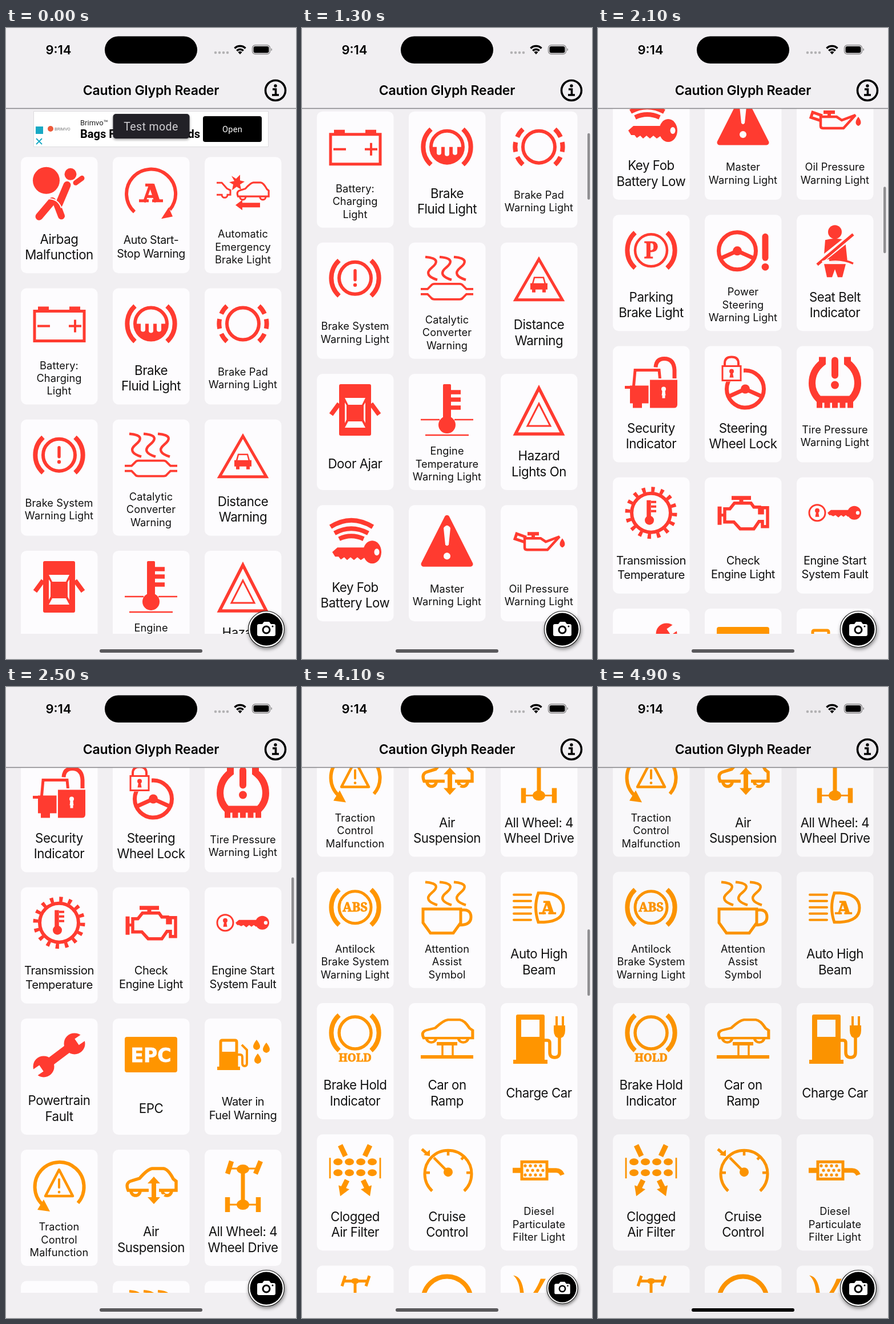
An HTML page that plays this animation: 508 px wide and 1102 px high, repeating every 5000 ms.

```html
<!DOCTYPE html>
<html lang="en">
<head>
<meta charset="utf-8">
<title>Dashboard lights</title>
<style>
html, body { margin: 0; width: 100%; height: 100%; overflow: hidden; background: #f1eff2 }
svg { display: block; width: 508px; height: 1102px; font-family: Inter, "Noto Sans", sans-serif }
.ad { font-family: Roboto, sans-serif }
.mid { text-anchor: middle }
#fab { filter: drop-shadow(1px 3px 3px #0007) }
#menu { filter: drop-shadow(1px 2px 2px #0007) }
</style>
</head>
<body>
<svg viewBox="0 0 508 1102">
  <clipPath id="view"><path d="M0 141H508V1058H0z"/></clipPath>
  <g id="app">
    <path d="M-80 -80H588V1182H-80z" fill="#f1eff2"/>
    <g clip-path="url(#view)">
      <g id="list">
        <g class="ad">
          <path d="M48.5 145.5h411v62h-411z" fill="#fff" stroke="#dcdbde"/>
          <path d="M52 172h13v13h-13z" fill="#18a9c4"/>
          <path d="M53 193l10 10m0-10l-10 10" stroke="#18a9c4" stroke-width="1.8"/>
          <circle cx="78" cy="176" r="5" fill="#ee5a3a"/>
          <text x="85" y="179" font-size="7.5" fill="#777">BRIMVO</text>
          <text x="130" y="170" font-size="13" fill="#222">Brimvo™</text>
          <g font-size="20" font-weight="700">
            <text x="130" y="192">Bags For</text>
            <text x="340" y="192" text-anchor="end">Weekends</text>
          </g>
          <rect x="345" y="154" width="103" height="45" rx="4"/>
          <text class="mid" x="396.5" y="182" font-size="14.5" fill="#fff" letter-spacing=".3">Open</text>
          <rect x="187.5" y="150" width="134" height="43" rx="5" fill="#222127" style="filter:drop-shadow(0 2px 2px #0006)"/>
          <text class="mid" x="254" y="179" font-size="19.5" fill="#cfced2" letter-spacing=".4">Test mode</text>
        </g>
      </g>
      <rect id="bar" x="500" width="4.5" height="116" rx="2.2" fill="#908f92"/>
    </g>
    <path d="M0 140.5H508" stroke="#858487" stroke-width="1.5"/>
    <text class="mid" x="254" y="117" font-size="23" font-weight="600" letter-spacing="-.2">Caution Glyph Reader</text>
    <g fill="none" stroke="#000" stroke-width="3.6">
      <circle cx="472" cy="109" r="17.5"/>
      <path d="M467 107h5.5v9.5M466 117h12"/>
    </g>
    <circle cx="472" cy="101" r="2.7"/>
  </g>
  <path id="shade" d="M0 0H508V1102H0z"/>

  <text class="mid" x="92" y="46" font-size="22" font-weight="600">9:14</text>
  <rect x="173" y="14.5" width="162" height="47.5" rx="23.7"/>
  <path id="dots" d="M367 43h0m7 0h0m7 0h0m7 0h0" stroke="#807f82" stroke-opacity=".55" stroke-width="4.6" stroke-linecap="round"/>
  <path d="M400.5 35.5a13.5 13.5 0 0 1 19 0M404.3 39.7a8 8 0 0 1 11.4 0" fill="none" stroke="#000" stroke-width="3.5"/>
  <path d="M410 46l-3.5-3.8a5 5 0 0 1 7 0z"/>
  <rect x="431.5" y="30" width="31" height="15.5" rx="5" fill="none" stroke="#000" stroke-opacity=".45" stroke-width="1.3"/>
  <rect x="433.5" y="32" width="27" height="11.5" rx="3"/>
  <path d="M464.5 35q3 2.5 0 5.5z" fill-opacity=".5"/>

  <g id="menu">
    <rect x="337" y="851" width="74" height="33" rx="4" fill="#fff"/>
    <rect x="351" y="922" width="60" height="33" rx="4" fill="#fff"/>
    <g class="mid" font-size="16.5" font-weight="500">
      <text x="374" y="874">Camera</text>
      <text x="381" y="945">Photo</text>
    </g>
    <g fill="none" stroke="#fff" stroke-width="3.5">
      <path d="M451 857h6l3-4.5h12l3 4.5h6q3 0 3 3v20q0 3-3 3h-30q-3 0-3-3v-20q0-3 3-3z"/>
      <ellipse cx="466" cy="869" rx="7" ry="8"/>
    </g>
    <circle cx="479" cy="861.5" r="1.8" fill="#fff"/>
    <rect x="447" y="922" width="38" height="33" rx="4" fill="#fff"/>
    <path d="M450 948l9-9 6 5 9-9 9 11v5h-33z" fill="#4d4b4d"/>
    <circle cx="459" cy="932" r="4" fill="#4d4b4d"/>
  </g>

  <g id="fab">
    <circle r="31.5" fill="#fff" stroke="#222" stroke-width="1.2"/>
    <circle r="28.5"/>
    <path d="M-13 -9h6l3-4h9l3 4h5q3 0 3 3v15q0 3-3 3h-26q-3 0-3-3v-15q0-3 3-3z" fill="#fff"/>
    <circle cx="0" cy="1" r="6" fill="none" stroke="#000" stroke-width="3"/>
    <circle cx="11" cy="-5" r="1.5"/>
  </g>
  <rect id="home" x="164" y="1085" width="180" height="6" rx="3"/>
</svg>
<script>
const $ = id => document.getElementById(id);
const RED = '#ff3b30', ORANGE = '#ff9500', WHITE = '#fdfcfe', INK = 'currentColor';
const L = 27.4, M = 24.6, S = 22.4;   // label line heights

// Drawing helpers; every icon is centred on 0,0 in a 92 px box
const fill = (d, c = INK) => `<path d="${d}" fill="${c}"/>`;
const line = (d, w = 4, c = INK, more = '') =>
  `<path d="${d}" fill="none" stroke="${c}" stroke-width="${w}" ${more}/>`;
const round = (d, w, c) => line(d, w, c, 'stroke-linecap="round" stroke-linejoin="round"');
const dot = (x, y, r, c = INK, ry = r) => `<ellipse cx="${x}" cy="${y}" rx="${r}" ry="${ry}" fill="${c}"/>`;
const ring = (x, y, r, w, dash = '') =>
  `<circle cx="${x}" cy="${y}" r="${r}" fill="none" stroke="${INK}" stroke-width="${w}" stroke-dasharray="${dash}"/>`;
const word = (s, y, size, c = INK, font = '"Noto Serif", serif') =>
  `<text class="mid" y="${y}" font-size="${size}" font-weight="900" fill="${c}" stroke="${c}" stroke-width=".8" style='font-family:${font}'>${s}</text>`;
const move = (t, s) => `<g transform="${t}">${s}</g>`;
const mirror = s => s + move('scale(-1 1)', s);

// Shared parts
const brackets = dash => line('M-28 -31A42 42 0 0 0 -28 31M28 -31A42 42 0 0 1 28 31', 8, INK, `stroke-dasharray="${dash || ''}"`);
const brake = (s, w = 6, dash) => move('translate(0 -3)', brackets(dash) + ring(0, 0, 28, w) + s);
const heat = y => [-38, -13, 12].map(x => line(`M${x} ${y}c24 2 22 10 11 19s-6 16 10 21`, 4.4)).join('');
const bang = (y, h, w, gap, x = 0) => round(`M${x} ${y}v${h}`, w) + dot(x, y + h + gap, w * .58);
const drop = (x, y) => fill(`M${x} ${y}q12 15 0 18q-12-3 0-18z`);
const car = w => line('M-40 6q-6-14 7-17l13-4q14-16 22-17h20q8 1 17 18l5 4v16z', w)
  + line('M-35 7a8 8 0 0 0 16 0M20 7a8 8 0 0 0 16 0', w);
const wheel = (x, y) => ring(x, y, 32.5, 7) + line(`M${x - 29} ${y + 13}L${x} ${y}L${x + 29} ${y + 13}`, 7) + dot(x, y, 8);
const keyhole = (x, y, c) => dot(x, y, 4, c) + fill(`M${x - 1.5} ${y}h3l2 11h-7z`, c);
const gauge = line('M-29 31A43 43 0 1 1 33 27', 6);
const slabA = line('M-2 -14L-12 14M-9 4h17M-21 11.5h17M2 11.5h19M-10 -16h14', 5) + line('M1 -17L11 13', 10);

const cards = [
  ['Airbag|Malfunction', L, dot(-22.5, -24, 23.5) + dot(20, -35, 10.5) + round('M14 -16L0 17', 13)
    + round('M29 -20L40 -28', 9) + round('M-12 12L-35 39', 13) + round('M-4 17L4 38', 12) + line('M-18 8Q-2 8 4 24', 2, WHITE)],
  ['Auto Start-|Stop Warning', 24, gauge + fill('M18 43L38 39L31 23z') + slabA],
  ['Automatic|Emergency|Brake Light', S, move('translate(17 0) scale(.64)', car(5)) + line('M-46 -20h9l9 10 6 3v8h-5a5 5 0 0 1-10 0h-9', 3)
    + fill('M-20 -32l8 5 7-7v10l8 2-8 5 2 9-8-5-8 6 2-10-7-4 9-2z') + fill('M-13 19l12-9v5h31v8h-31v5z')],

  ['Battery:|Charging|Light', S, line('M-43 -25h87v52h-87z', 5) + fill('M-37 -33h19v8h-19zM18 -33h19v8h-19z')
    + line('M-38 1h22M17 1h22M28 -10v22', 4)],
  ['Brake|Fluid Light', L, brake(fill('M-28 0h56a28 28 0 0 1-56 0z') + round('M-14 0v10M0 0v12M14 0v10', 8, WHITE))],
  ['Brake Pad|Warning Light', S, brake('', 6, '17 9.5')],

  ['Brake System|Warning Light', S, brake(bang(-13, 16, 5.5, 9))],
  ['Catalytic|Converter|Warning', S, heat(-40)
    + line('M-46 16h12l6-6q2-3 6-3h44q4 0 6 3l6 6h12M-46 25h12l6 6q2 3 6 3h44q4 0 6-3l6-6h12', 3.8)],
  ['Distance|Warning', L, line('M0 -36L41 35H-41z', 5) + line('M-11 7l3-11h16l3 11', 2.5)
    + fill('M-15 6h30v11h-30zM-12 17h6v5h-6zM6 17h6v5h-6z')],

  ['Door Ajar', L, fill('M-25 -47h50q3 0 3 3v84q0 3-3 3h-50q-3 0-3-3v-84q0-3 3-3z')
    + fill('M-18 -23h36l-6 12h-24zM-18 29h36l-6-11h-24zM-18 -15l3 5v25l-3 6zM18 -15l-3 5v25l3 6z', WHITE) + mirror(line('M-28 -13L-42 6', 8))],
  ['Engine|Temperature|Warning Light', S, fill('M-7 -45q0-2 2-2h10q2 0 2 2v62h-14z') + dot(0, 24, 15)
    + line('M6 -33h18M6 -20h18M6 -6h18', 7.5) + line('M-46 15h33M13 15h33M-38 42h76', 2.5)],
  ['Hazard|Lights On', L, line('M0 -40L41 40H-41z', 5.5) + line('M0 -13L20 26H-20z', 3)],

  ['Key Fob|Battery Low', L, line('M-43 -27q36-23 74 0M-36 -16q29-16 59 0M-28 -6q21-10 43 0', 8)
    + dot(30, 17, 16, INK, 20) + dot(38, 17, 4.5, WHITE, 6) + fill('M-40 17l9-8h50v16l-9 6-6-5-6 5-6-5-6 5-5-5-6 4-4-5h-6z')],
  ['Master|Warning Light', S, fill('M0 -43L41 38H-41z') + round('M0 -43L41 38H-41z', 9)
    + fill('M-6 -25q6-9 12 0l-3 29q-3 4-6 0z', WHITE) + dot(0, 24, 6, WHITE)],
  ['Oil Pressure|Warning Light', S, line('M-25 -7h28l9 6 24-9-21 23h-36q-4 0-4-4z', 4.5) + line('M-24 0l-18-6 3-9 17 6', 5)
    + line('M-20 -15h20M-10 -15v9', 6) + fill('M41 -7q9 12 0 16q-9-4 0-16z')],

  ['Parking|Brake Light', L, brake(word('P', 14, 39), 4.5)],
  ['Power|Steering|Warning Light', S, wheel(-10, -2) + bang(-27, 37, 11, 16, 39)],
  ['Seat Belt|Indicator', L, dot(0, -35, 12) + fill('M-17 -21q17-5 35 0l4 38h-42zM-19 21h38l-6 23h-8l-5-14-5 14h-9z')
    + line('M-34 22L35 -33', 11, WHITE) + line('M-31 22L32 -31', 5) + line('M-22 18q24-9 52 3', 5, WHITE) + line('M-10 14q22-3 42 6', 3.5)],

  ['Security|Indicator', L, line('M-31 10l3-33h42l3 30', 5) + fill('M-37 4h38v31h-17v8h-16v-8h-5z') + line('M-46 7h13', 5)
    + line('M8 -28q1-15 15-15q17 0 18 20v18', 7) + line('M-3 43v-50h49', 3, WHITE)
    + fill('M-2 -6h48v43q0 6-6 6h-42z') + keyhole(22, 10, WHITE) + line('M22 12v14', 5, WHITE)],
  ['Steering|Wheel Lock', L, wheel(4, 10) + fill('M-40 -35h41v32h-41z', WHITE) + line('M-36 -30h32v25h-32z', 3)
    + line('M-32 -31v-4q0-11 12-11t12 11v4', 4) + keyhole(-20, -21)],
  ['Tire Pressure|Warning Light', S, line('M-22 -46v10q-18 14-18 36q0 16 12 28h56q12-12 12-28q0-22-18-36v-10', 12)
    + line('M-32 37h64', 12, INK, 'stroke-dasharray="10 3.5"') + bang(-40, 26, 12, 17)],

  ['Transmission|Temperature', 25, ring(0, -3, 34, 6) + ring(0, -3, 41, 9, '6 10.1') + line('M-4 -25v30', 7.5) + dot(-3, 10, 8)
    + line('M0 -22h9M0 -14h9M0 -6h9', 4)],
  ['Check|Engine Light', M, line('M-32 -10h9l8-10h29l5 7h10v10h5v-9h9v33h-9v-9h-6l-9 13h-24l-11-12h-16z', 5.5)
    + line('M-20 -29h34M-3 -29v9', 7) + line('M-41 -14v32', 7) + line('M-41 1h9', 5)],
  ['Engine Start|System Fault', M, ring(-31, -3, 14, 3) + keyhole(-31, -7) + fill('M-13 -3l6-5h34v9l-4 3-4-3-4 3-4-3-5 4-5-4-4 2-4-2h-3z')
    + dot(34, -3, 12) + dot(40, -3, 3.2, WHITE)],

  ['Powertrain|Fault', L, line('M-24 17L24 -19', 15) + dot(-27, 19, 18.5) + dot(27, -21, 18.5)
    + line('M-31 22L-50 35M31 -24L50 -37', 13, WHITE)],
  ['EPC', L, fill('M-42 -33h84q4 0 4 4v54q0 4-4 4h-84q-4 0-4-4v-54q0-4 4-4z') + word('EPC', 11, 33, WHITE, '"DejaVu Sans", sans-serif'), ORANGE],
  ['Water in|Fuel Warning', M, line('M-39 22v-46q0-3 3-3h22q3 0 3 3v46', 5) + fill('M-40 -7h30v28h-30zM-45 19h40v6h-40z')
    + line('M-10 -2h5q4 0 4 5v10q0 5 4 5t4-5v-23l-9-9', 4) + drop(24, -28) + drop(41, -23) + drop(26, -4), ORANGE],

  ['Traction|Control|Malfunction', S, move('scale(-1 1)', line('M-33 28A43 43 0 1 1 29 31', 6)) + fill('M-38 40L-16 43L-27 22z')
    + round('M0 -30L24 16H-24z', 4.5) + bang(-13, 14, 4, 8), ORANGE],
  ['Air|Suspension', L, car(5.5) + line('M5 -20l13 14h-7v22h7l-13 14-13-14h7v-22h-7z', 6, WHITE)
    + fill('M5 -18l11 12h-7v24h7l-11 12-11-12h7v-24h-7z'), ORANGE],
  ['All Wheel: 4|Wheel Drive', L, line('M-24 -32h48M-26 31h52', 3) + line('M0 -32v64', 7) + dot(0, -31, 11, INK, 8) + dot(0, 31, 11, INK, 9)
    + line('M-27 -23l7-22M22 -23l9-22M-27 18v26M27 18v26', 8.5), ORANGE],

  ['Antilock|Brake System|Warning Light', S, brake(line('M-24 -1h48', 19, WHITE) + word('ABS', 7, 22), 5), ORANGE],
  ['Attention|Assist|Symbol', S, heat(-47) + line('M-42 0h66v24l-13 18h-40l-13-18z', 5) + line('M24 2q18-3 18 12q0 14-20 14', 5), ORANGE],
  ['Auto High|Beam', L, round('M-44 -25h30M-44 -14h30M-44 -3h30M-44 8h30M-44 19h30', 4)
    + line('M-1 -28h10q34 2 34 26q0 23-34 25h-10q-9-26 0-51z', 5) + move('translate(15 -1) scale(.72)', slabA), ORANGE],

  ['Brake Hold|Indicator', L, move('translate(0 -13)', brackets() + ring(0, 0, 28, 5.5)) + word('HOLD', 37, 19), ORANGE],
  ['Car on|Ramp', L, move('translate(0 -9) scale(1.02 .84)', car(5)) + line('M-18 6h36M-46 29h92', 6) + line('M-8 8v20M10 8v20', 3.5), ORANGE],
  ['Charge Car', L, fill('M-37 -45h44q3 0 3 3v76h5v7h-60v-7h5v-76q0-3 3-3z') + fill('M-31 -36h32v30h-32z', WHITE)
    + line('M10 0h5q4 0 4 5v16q0 9 8.5 9t8.5-9v-25', 5.5) + fill('M26 -26h20v9q0 12-10 14q-10-2-10-14z') + line('M31 -42v16M42 -42v16', 4), ORANGE],

  ['Clogged|Air Filter', L, mirror(line('M-44 -24v36', 2.8) + [-17, 2].map(y => dot(-30, y, 8, INK, 6) + dot(-10, y, 8, INK, 6)).join('')
    + line('M-26 -46l9 19M-14 15l-7 14', 9) + fill('M-29 24l3 19 16-12z')), ORANGE],
  ['Cruise|Control', L, line('M-26 34A41 41 0 1 1 30 34', 5) + line('M2 -37v9M-39 2h9M34 2h9M31 -27l-6 6M-23 -24L2 1', 4.5) + dot(2, 1, 8)
    + line('M-44 -39l8 7', 5) + fill('M-41 -29l11 2v-11z'), ORANGE],
  ['Diesel|Particulate|Filter Light', S, line('M-30 -17h44v30h-44z', 5) + line('M-46 -2h14', 9) + line('M16 -2h14q8 0 11 8', 8)
    + [-10, -2, 6].map((y, i) => [0, 1, 2, 3].map(n => dot(-24 + n * 9 + i % 2 * 4, y, 2.6)).join('')).join(''), ORANGE],

  ['', L, line('M-20 -38h40M0 -38v40', 5) + line('M-23 -29l6-18M19 -29l6-18', 5) + dot(0, -38, 7, INK, 5), ORANGE],
  ['', L, ring(0, -4, 42, 8), ORANGE],
  ['', L, fill('M-45 -48q17 2 19 36h-7q0-26-12-36zM12 -42h-9q-6 16-17 30h9z'), ORANGE],
];

const label = (text, lh) => {
  const lines = text.split('|'), size = lh * .813;
  return lines.map((s, i) => `<text class="mid" x="67" y="${157 + (i - (lines.length - 1) / 2) * lh + size * .36}"
    font-size="${size}" letter-spacing="${lh === S ? .005 : -.02}em" fill="#111">${s}</text>`).join('');
};

$('list').innerHTML += cards.map(([text, lh, icon, color = RED], i) =>
  move(`translate(${26 + i % 3 * 161} ${225.3 + (i / 3 | 0) * 229.2})`,
    `<rect width="134.5" height="203" rx="10" fill="${WHITE}"/>` + label(text, lh)
    + `<g transform="translate(67 65)" color="${color}">${icon}</g>`)).join('');

const mix = (keys, t) => {
  if (t <= keys[0][0]) return keys[0][1];
  const i = keys.findIndex(k => t <= k[0]);
  if (i < 0) return keys[keys.length - 1][1];
  const [t0, a] = keys[i - 1], [t1, b, ease = u => u] = keys[i];
  return a + (b - a) * ease((t - t0) / (t1 - t0));
};
const SCROLL = [[900, 0], [1000, 83], [1700, 610], [2500, 1480], [2800, 2194.5, u => u * (2 - u)]];
const OPEN = [[4100, 0], [4400, 1], [4700, 1], [4800, .4], [4900, .025]];
const PRESS = [[4000, 1], [4100, .86], [4200, .8], [4700, .8], [4900, 1]];

function draw() {
  const t = Math.floor(performance.now() % 5000 / 100) * 100;   // steps of 100 ms
  const y = mix(SCROLL, t), open = mix(OPEN, t);
  $('list').setAttribute('transform', `translate(0 ${-y})`);
  $('bar').setAttribute('y', 144.5 + y * .127);
  $('bar').setAttribute('opacity', t >= 1000 && t < 4700 ? 1 : 0);
  $('app').style.filter = open > .1 ? `blur(${16 * open}px)` : 'none';
  $('shade').setAttribute('opacity', .65 * open);
  $('menu').setAttribute('opacity', open > .1 ? open : 0);
  $('dots').setAttribute('opacity', 1 - .4 * open);
  $('fab').setAttribute('transform', `translate(456 1050) scale(${mix(PRESS, t)})`);
  $('home').setAttribute('fill', t === 4900 ? '#000' : open > .5 ? '#3a393b' : '#5a595c');
  requestAnimationFrame(draw);
}
draw();
</script>
</body>
</html>
```
